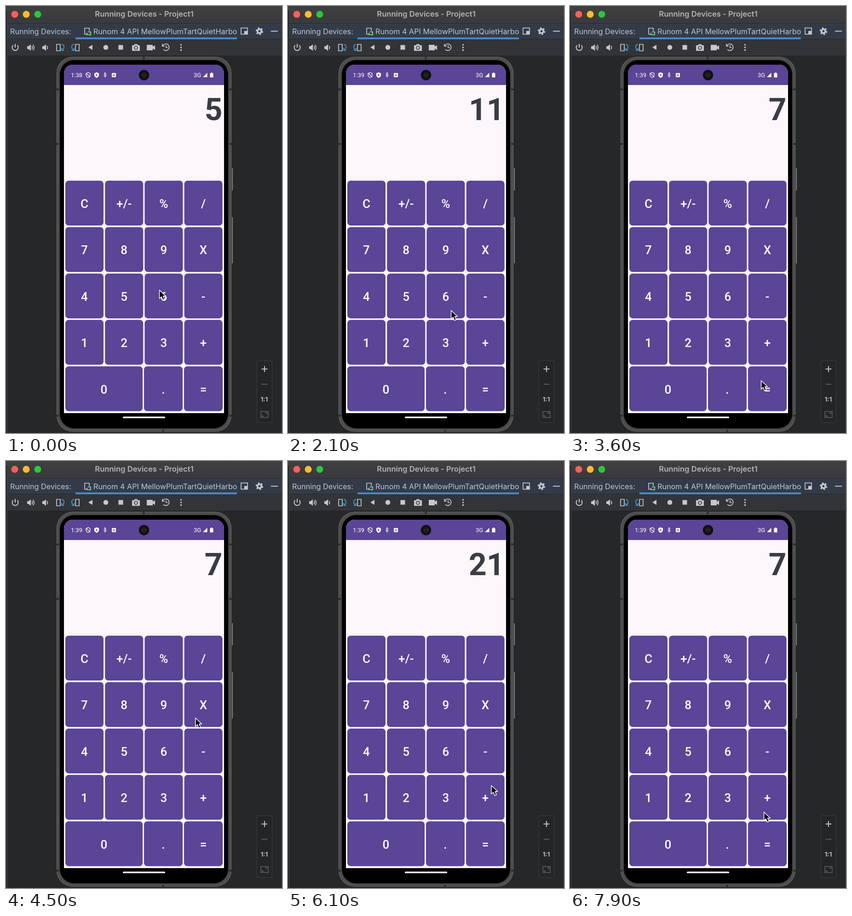
Write an HTML page that moves like this. It is 600 px wide and 924 px high and loops after 8 s.

```html
<!DOCTYPE html>
<html lang="en">
<head>
<meta charset="utf-8">
<title>Calculator on a running device</title>
<style>
  html, body { margin: 0; width: 100%; height: 100%; overflow: hidden; background: #262729; }
  svg { display: block; width: 100vw; height: 100vh; }
  text { white-space: pre; }
  .ui { font-family: Inter, "Open Sans", sans-serif; }
  .key, .status, #display { font-family: Roboto, sans-serif; fill: #fff; }
  .key { font-size: 26px; font-weight: 500; text-anchor: middle; }
  .status { font-size: 13px; }
  #display { font-size: 67.5px; font-weight: 700; text-anchor: end; fill: #3b3c44; }
  .line { fill: none; stroke: #c5c8cc; stroke-width: 1.7; }
  .fill { fill: #c5c8cc; }
</style>
</head>
<body>
<svg viewBox="0 0 600 924" preserveAspectRatio="none">
  <defs>
    <clipPath id="tab"><rect x="186" y="40" width="316" height="28"/></clipPath>
    <clipPath id="screen"><rect x="126" y="127" width="348" height="774" rx="19"/></clipPath>
    <linearGradient id="bar" x2="0" y2="1">
      <stop stop-color="#403f42"/><stop offset="1" stop-color="#3a393c"/>
    </linearGradient>
  </defs>

  <!-- window -->
  <rect width="600" height="924" fill="#262729"/>
  <rect width="600" height="37" fill="url(#bar)"/>
  <rect y="37" width="600" height="35" fill="#333b48"/>
  <rect y="72" width="600" height="36" fill="#333437"/>
  <path d="M0 37.5H600M0 71.5H600M0 107.5H600" stroke="#28292c"/>
  <rect y="10" width="2" height="914" fill="#1d1e20"/>
  <path d="M2.5 12V924M599.5 10V924" stroke="#47484a"/>
  <circle cx="19" cy="18" r="7.5" fill="#fe5f57"/>
  <circle cx="44" cy="18" r="7.5" fill="#febc2e"/>
  <circle cx="69" cy="18" r="7.5" fill="#28c840"/>
  <text class="ui" x="300.5" y="22.5" font-size="16.6" font-weight="600" text-anchor="middle" fill="#b5b4b6">Running Devices - Project1</text>

  <!-- tab strip -->
  <text class="ui" x="9" y="60.5" font-size="16.2" fill="#c3c6cb">Running Devices:</text>
  <rect x="151" y="68" width="351" height="4" fill="#4a88c7"/>
  <g clip-path="url(#tab)">
    <text class="ui" x="190" y="60.5" font-size="16.2" fill="#c3c6cb">Runom 4 API MellowPlumTartQuietHarbor</text>
  </g>
  <path class="line" d="M181 54V48H171V61H176M176 58V62H184V56H178"/>
  <circle cx="183" cy="62" r="2.3" fill="#00e62e"/>
  <rect class="line" x="511" y="47.5" width="14" height="13.5"/>
  <rect class="fill" x="518" y="54" width="7" height="7"/>
  <g transform="translate(551 54.5)">
    <circle class="line" r="4.2" style="stroke-width:3.6"/>
    <circle class="line" r="6.9" style="stroke-width:2.7" stroke-dasharray="3.6 3.625"/>
  </g>
  <rect class="fill" x="576" y="53.5" width="15" height="2"/>

  <!-- toolbar -->
  <path class="line" d="M20 82V90M15.5 85A6.5 6.5 0 1 0 24.5 85" style="stroke-width:2"/>
  <path class="fill" d="M46 87H49L54 83V97L49 93H46ZM79 87H82L87 83V97L82 93H79Z"/>
  <path class="line" d="M56.5 86.5Q58.5 90 56.5 93.5M59 84Q63 90 59 96M89.5 86.5Q91.5 90 89.5 93.5"/>
  <path class="line" d="M110 83H118V97H110ZM151 83H159V97H151Z"/>
  <path d="M121 83Q127 84 126 90Q125 94 121 96M121 96V91M121 96H126M148 83Q142 84 143 90Q144 94 148 96M148 96V91M148 96H143" fill="none" stroke="#3592d4" stroke-width="2"/>
  <path class="fill" d="M188 84V95L179 89.5Z"/>
  <circle class="fill" cx="217" cy="89.5" r="5.3"/>
  <rect class="fill" x="244.5" y="84.5" width="10" height="10"/>
  <path class="fill" d="M274 85H278L280 82.5H285L287 85H291V97H274Z"/>
  <circle cx="282.5" cy="90.5" r="3.5" fill="#c5c8cc" stroke="#333437" stroke-width="1.7"/>
  <path class="fill" d="M306 84H319V88L324 85V95L319 92V96H306Z"/>
  <path class="line" d="M341 86A7.2 7.2 0 1 1 342 94M340 82V87H345M348 85V90H352"/>
  <g class="fill"><circle cx="380.5" cy="84" r="1.8"/><circle cx="380.5" cy="89.7" r="1.8"/><circle cx="380.5" cy="95.4" r="1.8"/></g>

  <!-- phone body -->
  <path d="M491.5 351V399M491.5 457V557" stroke="#5f5f61" stroke-width="3"/>
  <path d="M492.5 351V399M492.5 457V557" stroke="#98989a"/>
  <g id="body"></g>
  <path d="M109 180.5H115M109 298.5H115M109 886.5H115M485 180.5H491M485 298.5H491M485 886.5H491M299.5 110V115M341.5 917V922" stroke="#2c2c2e" stroke-width="4"/>

  <!-- phone screen -->
  <g clip-path="url(#screen)">
    <rect x="126" y="127" width="348" height="754" fill="#fdf7fc"/>
    <rect x="126" y="127" width="348" height="44" fill="#5a4596"/>
    <rect x="126" y="881" width="348" height="20"/>
  </g>
  <rect x="254" y="888.5" width="92" height="3.5" rx="1.75" fill="#fff"/>
  <circle cx="300" cy="149.5" r="11.2" fill="#101011"/>
  <circle cx="300" cy="149.5" r="6.5" fill="#1c1c1d"/>
  <path d="M296 149.5h2M302 149.5h2" stroke="#48494b" stroke-width="1.5"/>
  <text class="status" id="clock" x="141" y="154">1:38</text>
  <path d="M174 146L178.5 144L183 146V149Q183 153 178.5 155Q174 153 174 149ZM174 145L183 154" fill="none" stroke="#fff" stroke-width="1.3"/>
  <path d="M197 143.5L202 145.5V149Q202 153.5 197 155.5Q192 153.5 192 149V145.5Z" fill="#fff"/>
  <path d="M195.5 147V152L199.5 149.5Z" fill="#5a4596"/>
  <path d="M215.5 144L217.3 147L215.5 150L213.7 147ZM212.5 150L215.5 152.5L218.5 150M215.5 152V155" fill="none" stroke="#fff" stroke-width="1.1"/>
  <rect x="230" y="145" width="9" height="9" rx="1" fill="#fff"/>
  <path d="M232.2 152L234.5 146.8L236.8 152M233 150.5H236" fill="none" stroke="#5a4596"/>
  <text class="status" x="408" y="154">3G</text>
  <path d="M437.5 144.5V154H428ZM443.5 145.5H445.5V144H448.5V145.5H450.5V154.5H443.5Z" fill="#fff"/>
  <text id="display" x="470.5" y="246.5">5</text>
  <g id="keys"></g>

  <!-- zoom panel -->
  <rect x="545.5" y="767.5" width="33" height="134" rx="3" fill="#242527" stroke="#36373a" stroke-width="1.5"/>
  <path d="M555.5 785.5H568.5M562 779V792" stroke="#c1c3c6" stroke-width="2"/>
  <path d="M555.5 818.5H568.5" stroke="#5d5f62" stroke-width="1.8"/>
  <text class="ui" x="561.5" y="855.5" font-size="13" font-weight="700" text-anchor="middle" fill="#c1c3c6">1:1</text>
  <path d="M554 877.5H570V890.5H554ZM557 885V888H560M564 880H567V883" fill="none" stroke="#606265" stroke-width="1.5"/>

  <g id="cursor">
    <path d="M.6 .8V19L4.9 15.2L7.9 22.4L11.6 20.8L8.6 13.8H14.3Z" stroke="#fff" stroke-width="1.5" stroke-linejoin="round"/>
  </g>
</svg>
<script>
  const LOOP = 8000, STEP = 100;
  const $ = id => document.getElementById(id);

  // [time, x, y] of the pointer tip
  const path = [
    [0, 333, 614], [200, 334, 614], [800, 424, 823], [1300, 424, 823],
    [2100, 354, 658], [2400, 424, 628], [2500, 424, 628],
    [2900, 168, 626], [3100, 168, 626], [3500, 414, 809], [3700, 416, 811],
    [4200, 424, 524], [4400, 424, 524], [4800, 342, 724], [5000, 342, 724],
    [5400, 456, 829], [5800, 456, 829], [6600, 410, 426], [6900, 410, 426],
    [7300, 170, 526], [7500, 170, 526], [7900, 421, 759], [8000, 426, 810]
  ];
  const readout = [
    [0, "5"], [200, "6"], [900, "11"], [2900, "4"], [3500, "7"],
    [4900, "3"], [5500, "21"], [7400, "7"]
  ];
  const clock = [[0, "1:38"], [1600, "1:39"]];

  function add(parent, tag, attrs, label = "") {
    const el = document.createElementNS("http://www.w3.org/2000/svg", tag);
    for (const name in attrs) el.setAttribute(name, attrs[name]);
    el.textContent = label;
    parent.append(el);
  }

  // metal rim, one grey level per pixel from the edge inwards
  [48, 100, 84, 70, 74, 86, 78, 48, 20, 0].forEach((grey, inset) =>
    add($("body"), "rect", {
      x: 109 + inset, y: 109 + inset, rx: 36 - inset * 0.6,
      width: 382 - inset * 2, height: 813 - inset * 2,
      fill: `rgb(${grey} ${grey} ${grey + 1})`
    }));

  function addKey(label, x, row, width) {
    const y = 378 + row * 100.45;
    add($("keys"), "rect", { x, y, width, height: 97, rx: 7, fill: "#5a4596" });
    add($("keys"), "text", { x: x + width / 2, y: y + 59, class: "key" }, label);
  }

  ["C +/- % /", "7 8 9 X", "4 5 6 -", "1 2 3 +"].forEach((labels, row) =>
    labels.split(" ").forEach((label, col) => addKey(label, 129 + col * 86.2, row, 83)));
  addKey("0", 129, 4, 168);
  addKey(".", 300, 4, 84);
  addKey("=", 387, 4, 84);

  const valueAt = (steps, t) => steps.filter(s => s[0] <= t).pop()[1];

  function pointAt(t) {
    const i = path.findIndex(p => p[0] > t);
    const [t0, x0, y0] = path[i - 1], [t1, x1, y1] = path[i];
    const u = (t - t0) / (t1 - t0), k = u * u * (3 - 2 * u);
    return [x0 + (x1 - x0) * k, y0 + (y1 - y0) * k];
  }

  const start = performance.now();
  function draw() {
    const elapsed = (performance.now() - start) % LOOP;
    const t = Math.floor(elapsed / STEP) * STEP;
    $("cursor").setAttribute("transform", `translate(${pointAt(t)})`);
    $("display").textContent = valueAt(readout, t);
    $("clock").textContent = valueAt(clock, t);
    requestAnimationFrame(draw);
  }
  draw();
</script>
</body>
</html>
```
